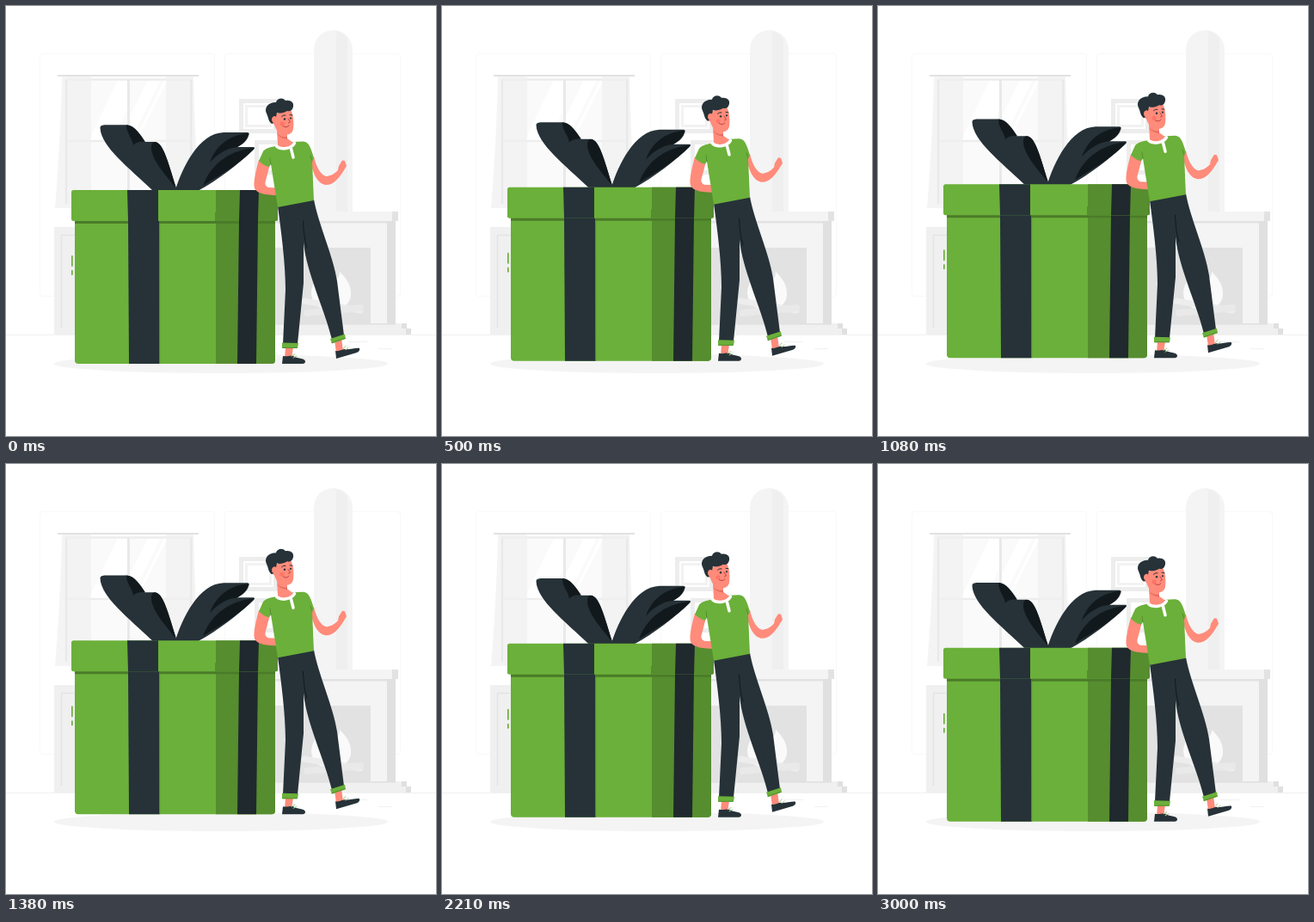
An HTML page that plays this animation: 500 px wide and 500 px high, repeating every 3.04 s.

```html
<!DOCTYPE html>
<html lang="en">
<head>
<meta charset="utf-8">
<title>Gift</title>
<style>
  html, body { margin: 0; width: 100%; height: 100%; overflow: hidden; background: #fff; }
  svg { display: block; width: 100%; height: 100%; }
  .green { fill: #6bb03a; }
  .shade { fill: #568d2f; }
  .dark { fill: #263238; }
  .ink { fill: #12191c; }
  .skin { fill: #ff8b7b; }
  .line { fill: none; stroke-linecap: round; stroke-linejoin: round; }
</style>
</head>
<body>
<svg viewBox="0 0 500 500">
  <g id="room">
    <g fill="none" stroke="#f8f8f8">
      <rect x="39.5" y="55.5" width="203" height="282" rx="3"/>
      <rect x="254.500" y="55.5" width="204" height="282" rx="3"/>
    </g>
    <path d="M0 382.500H500M433 398.500H449M398 390.500H420" stroke="#f1f1f1"/>

    <g id="window">
      <rect x="70" y="85" width="147" height="145" fill="#fafafa"/>
      <path d="M130 86H142V120L123 157H96ZM165 86H180L145 157H143V130ZM184 86H188L152 157H149Z" fill="#fff"/>
      <path d="M70 230V85.500H216V230M70 157H216" fill="none" stroke="#ededed" stroke-width="2.500"/>
      <path d="M142.500 86V214" stroke="#e9e9e9" stroke-width="3"/>
      <path d="M65 82H99V214L76 235H57C61 190 64 130 65 82ZM186 82H218C219 130 222 190 225 235H186Z" fill="#f0f0f0" opacity=".75"/>
      <path d="M70 86V230M215 86V214" stroke="#e9e9e9" stroke-width="2"/>
      <path d="M60 81H224" stroke="#e2e2e2" stroke-width="2"/>
    </g>

    <rect x="56" y="257" width="40" height="125" fill="#f0f0f0"/>
    <path d="M90 266.500H64.500V374" fill="none" stroke="#e3e3e3" stroke-width="1.500"/>

    <g id="pictures">
      <rect x="271" y="108" width="45" height="40" fill="#ededed"/>
      <rect x="276" y="113" width="35" height="30" fill="#fff"/>
      <rect x="279.500" y="116.500" width="28" height="23" fill="#fff" stroke="#f2f2f2" stroke-width="3"/>
      <rect x="289" y="156" width="34" height="40" fill="#ededed"/>
      <rect x="294" y="161" width="24" height="30" fill="#fff"/>
    </g>

    <g id="fireplace">
      <path d="M358 240V50.500a22.500 22.500 0 0 1 45 0V240Z" fill="#f4f4f4"/>
      <path d="M384 240V29C391 31 395 35 397 39V240Z" fill="#efefef"/>
      <path d="M290 250H443V370H290Z" fill="#f4f4f4"/>
      <path d="M443 250H453V370H443Z" fill="#e0e0e0"/>
      <path d="M290 239H449V250H290Z" fill="#f4f4f4"/>
      <path d="M449 239H456V250H449ZM290 250H443V252.500H290Z" fill="#e2e2e2"/>
      <path d="M313 281H424V369H313Z" fill="#e2e2e2"/>
      <path d="M378 353C363 354 355 344 355 333C356 320 365 315 367 304C376 306 381 311 384 318C387 316 388 313 388 309C396 317 402 325 401 337C400 347 391 353 378 353Z" fill="#fafafa"/>
      <path d="M347 343L412 354" stroke="#ededed" stroke-width="7" stroke-linecap="round"/>
      <path d="M350 357L412 351" stroke="#e9e9e9" stroke-width="8" stroke-linecap="round"/>
      <path d="M290 369H460V375H290ZM290 375H466V382H290Z" fill="#f0f0f0"/>
      <path d="M460 369H466V375H471V382H465V375H460ZM313 369H453V370.500H313Z" fill="#e0e0e0"/>
    </g>
    <ellipse cx="250" cy="416" rx="194" ry="11" fill="#f4f4f4"/>
  </g>

  <g id="bob">
    <g class="green">
      <rect x="76" y="290" width="1.700" height="13" rx=".8"/>
      <rect x="76" y="307" width="1.700" height="6" rx=".8"/>
    </g>

    <g id="bow">
      <path class="dark" d="M109.500 142C109.500 139 112 138.300 116 138.300H140C149 139 155 149 161 158H172C183 158 188 181 198 212L202 215H171C142 187 111 164 109.500 142Z"/>
      <path class="ink" d="M140 138.300C149 138.300 156 149 162 158C155 157 150 159 148 162C147 153 140 149 140 138.300Z"/>
      <path class="ink" d="M173 158C183 158 189 183 198 212C189 201 169 179 169 165C169 161 170 158 173 158Z"/>
      <path class="dark" d="M197 214C205 188 224 148 253 147H280C283 147 283 149 282 151C280 157 275 161 269 164H287C290 164 289 166 288 167C270 184 247 202 223 215H197Z"/>
      <path class="ink" d="M282.500 148C264 149 245 159 237 182C246 172 257 165 269 164C276 160 281 154 282.500 148Z"/>
      <path class="ink" d="M289 165C264 167 240 180 229 209C251 195 272 184 289 165Z"/>
    </g>

    <g id="box">
      <path class="green" d="M80 249H313V412Q313 416 309 416H84Q80 416 80 412Z"/>
      <path class="shade" d="M244 249H313V412Q313 416 309 416H244Z"/>
      <path d="M80 249H313V253H80Z" fill="#4b7b29"/>
      <path class="dark" d="M142 249H178L178.500 416H143Z"/>
      <path d="M178.700 253V416" stroke="#568d2f"/>
      <path d="M271 249H293L291 416H269Z" fill="#20292e"/>
      <rect class="green" x="76" y="214" width="240" height="36" rx="2.500"/>
      <path class="shade" d="M244 214H313.500Q316 214 316 216.500V247.500Q316 250 313.500 250H243V240H244Z"/>
      <path class="dark" d="M141 214H177V250H142Z"/>
      <path d="M272 214H294L293 250H271Z" fill="#20292e"/>
    </g>

    <g id="man">
      <path class="skin" d="M325 397H334L332 410H324ZM382 389L390 386L392 401L384 403Z"/>
      <path class="dark" d="M322 407C327 408 331 406 334 407C338 410 347 409 348 413Q348 416 345 416H321ZM383 401C388 402 391 399 394 399C399 400 407 397 411 398Q412 401 408 403L384 410Z"/>
      <path class="line" d="M332 407L336 405M334 409L338 407M392 399L395 395M395 400L398 397" stroke="#a9c98f" stroke-width="1"/>
      <path class="dark" d="M316 233L358 225C363 253 381 292 385 320L393 383L379 388C371 354 349 309 346 275V322L339 393H322L325 330C325 300 320 262 316 233Z"/>
      <path class="line" d="M345.500 250C346 262 347 272 350 281" stroke="#12191c" stroke-width="1"/>
      <path class="green" d="M321 391.500L340 392L339 398H321ZM377 387L394 381.500L395 387L379 392.500Z"/>
      <path class="line" d="M322 397.500H338M379 391.500L394 386.500" stroke="#568d2f" stroke-width="1"/>

      <path class="skin" d="M354 178C356 194 362 207 372 208C381 208 387 200 391 194L396 186L394 180L391 179.500L387 186L386 191C381 196 376 198 372 198C366 196 361 188 358 175Z"/>
      <path class="skin" d="M294 179C291 190 287 205 289 212C292 219 305 220 318 220L325 222.500L330 217L326 212L305 211C301 209 301 206 302 203L307 184Z"/>
      <path class="green" d="M313 163C307 164 301 166 299 169L294 180Q300 186 306 187L308 184L316 234L358 226L356 180L358 177C355 166 352 157 345 157.500L335 158Z"/>
      <path class="line" d="M308 184L307 177M356 180L354 174" stroke="#568d2f" stroke-width="1"/>
      <path class="skin" d="M315 144L316 162C322 168 333 165 334 159L327 154V146Z"/>
      <path class="line" d="M314.500 163C320 168 332 166 335.500 159.500M331.500 166L334 176" stroke="#fff" stroke-width="3.500"/>
      <path d="M315 148C319 152 323 153 327 152V155C322 154 317 152 315 148Z" fill="#e26d60"/>

      <path class="skin" d="M310 126L331 121C334 125 335 136 334 143C333 150 325 151 319 148C315 146 313 141 312 138C308 136 307 130 310 126Z"/>
      <path class="dark" d="M303 125C300 119 304 112 314 112C315 107 322 106 325 110C331 109 335 112 334 117C333 122 329 123 327 122C322 125 317 125 315 124C314 128 314 132 312 134C311 137 309 138 307 135C305 133 305 129 303 125Z"/>
      <path class="skin" d="M315 136C310 139 306 130 312 128C315 128 316 132 315 136Z"/>
      <circle class="dark" cx="324" cy="131.500" r="1.200"/>
      <circle class="dark" cx="331" cy="130.500" r="1.100"/>
      <path class="line" d="M320.500 128.500Q322 126.500 325 127M330 126.500L333 127" stroke="#263238" stroke-width="1"/>
      <path class="line" d="M328 131L330.500 135L328.500 136M322 139.500Q326 142.500 329 139" stroke="#b9473f" stroke-width="1"/>
      <circle cx="321" cy="137" r="2.500" fill="#ff7468"/>
    </g>
  </g>
</svg>
<script>
  const LOOP = 3040, RISE = 9.6;
  const bob = document.getElementById('bob');

  // Steady climb for half the loop, then steady descent.
  function render(time) {
    const phase = (time % LOOP) / LOOP;
    const lift = RISE * (1 - Math.abs(1 - 2 * phase));
    bob.setAttribute('transform', `translate(0 ${-lift.toFixed(3)})`);
  }

  let start;
  function tick(now) {
    start ??= now;
    render(now - start);
    requestAnimationFrame(tick);
  }
  render(0);
  requestAnimationFrame(tick);
</script>
</body>
</html>
```
